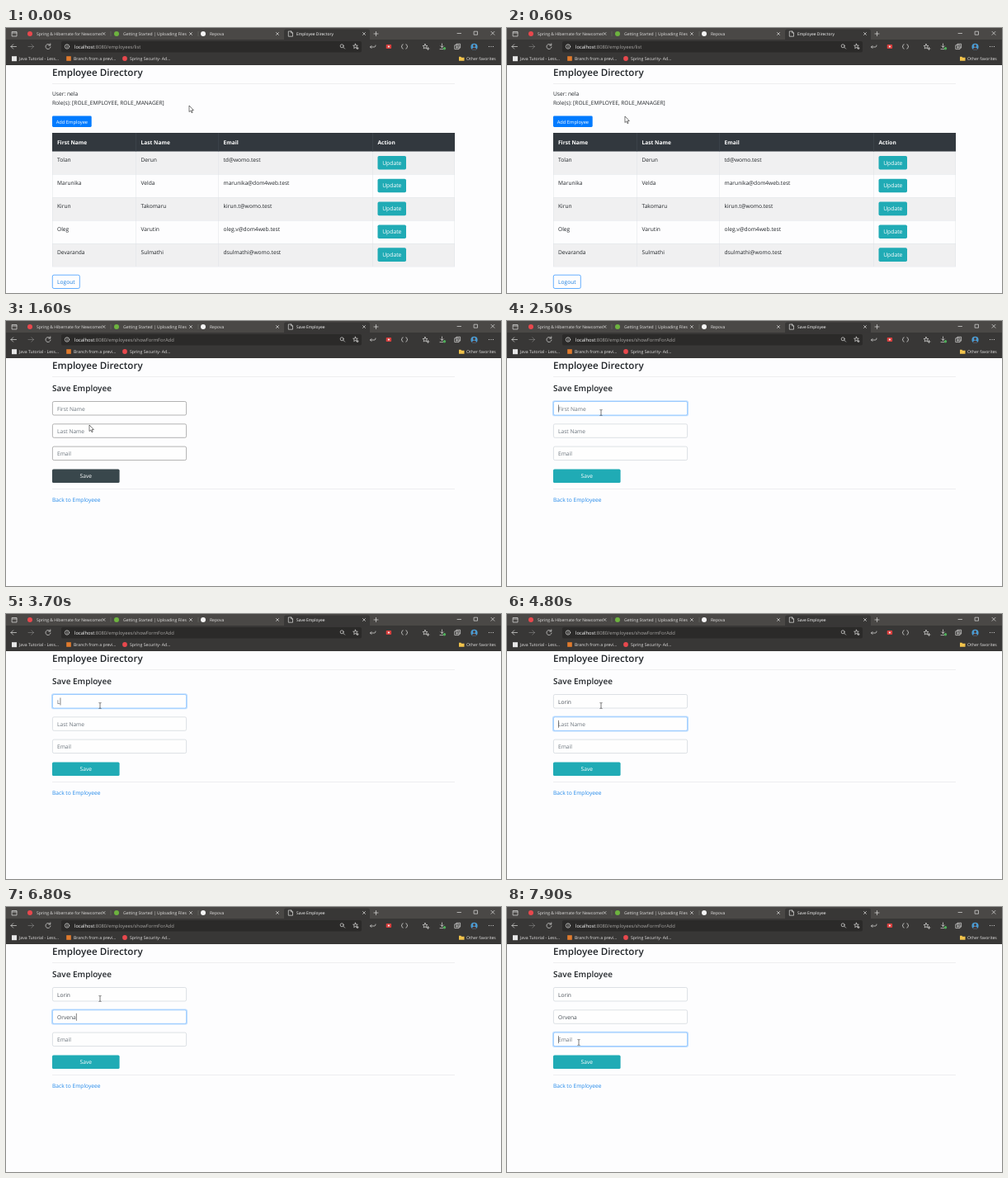
Animation, 600 px wide and 321 px high, one loop 8 s. Source, as an HTML page:

```html
<!DOCTYPE html>
<html lang="en">
<head>
<meta charset="utf-8">
<title>Employee Directory</title>
<style>
  html, body { margin: 0; width: 100%; height: 100%; overflow: hidden; background: #fdfdfe; }
  svg { display: block; width: 100vw; height: 100vh; }
  text { font-family: 'Open Sans', 'Noto Sans', sans-serif; text-rendering: geometricPrecision; white-space: pre; }
  .icon { fill: none; stroke: #dededd; stroke-width: .7; stroke-linecap: round; stroke-linejoin: round; }
</style>
</head>
<body>
<svg viewBox="0 0 600 321">
  <g id="chrome"></g>
  <g id="scene"></g>
</svg>
<script>
const LOOP = 8000, STEP = 100;
const PAGE_SWITCH = 1400, BUTTON_READY = 1900;
const INK = '#212529', TEAL = '#20abb5', BLUE = '#007bff', LINE = '#dee2e6';
const BODY = 6.65;

const text = (x, y, size, str, fill = INK, extra = '') =>
  `<text x="${x}" y="${y}" font-size="${size}" fill="${fill}" ${extra}>${str.replace(/&/g, '&amp;')}</text>`;
const rect = (x, y, w, h, fill, extra = '') =>
  `<rect x="${x}" y="${y}" width="${w}" height="${h}" fill="${fill}" ${extra}/>`;
const circle = (x, y, r, fill, extra = '') => `<circle cx="${x}" cy="${y}" r="${r}" fill="${fill}" ${extra}/>`;
const path = (d, extra = 'class="icon"') => `<path d="${d}" ${extra}/>`;
const BOLD = 'font-weight="600"', MIDDLE = 'text-anchor="middle"';

// Browser frame

const closeMark = (x, y, r) => path(`M${x - r} ${y - r}l${2 * r} ${2 * r}m0 ${-2 * r}l${-2 * r} ${2 * r}`);
const star = (x, y, r) => {
  const points = Array.from({ length: 10 }, (_, i) => {
    const a = i * Math.PI / 5 - Math.PI / 2, d = i % 2 ? r * .45 : r;
    return `${(x + d * Math.cos(a)).toFixed(2)} ${(y + d * Math.sin(a)).toFixed(2)}`;
  });
  return path(`M${points.join('L')}Z`);
};

function browserFrame() {
  const tab = (x, title, color) => circle(x, 7, 3, color) + text(x + 8, 8.9, 5.05, title, '#e4e3e2');
  const bookmark = (x, title, mark) => mark + text(x + 6, 38.9, 5.15, title, '#e4e3e2');
  return rect(0, 0, 600, 15, '#4a4846') + rect(0, 14, 600, 31, '#383736')
    + path('M337 14.5V4q0-2.5 2.5-2.5h99q2.5 0 2.5 2.5v10.5z', 'fill="#383736"')
    + path('M127 4v6M233 4v6', 'stroke="#777472" stroke-width=".5"')
    + path('M7.5 4.5h5.5v5.5h-5.5zM7.5 6h5.5')
    + tab(29, 'Spring & Hibernate for Newcomer', '#e8484d')
    + tab(134, 'Getting Started | Uploading Files', '#6db33f')
    + tab(239, 'Repova', '#f4f4f4')
    + path('M342.7 4h3l1.8 1.8v4.4h-4.8zM345.6 4v1.9h1.9')
    + [118.5, 224, 329, 434].map(x => closeMark(x, 7, 1.5)).join('')
    + path('M446 7h5m-2.5-2.5v5M547 6.5h4.5M567.5 4.2h4v4h-4z') + closeMark(590, 6.3, 2)
    // toolbar
    + rect(67, 16, 364, 13.5, '#2b2a29', 'rx="2"')
    + path('M12.5 22.5h-6.5m2.7-2.7l-2.7 2.7l2.7 2.7')
    + path('M27 22.5h6.5m-2.7-2.7l2.7 2.7l-2.7 2.7', 'class="icon" opacity=".4"')
    + path('M53.4 20.7a3 3 0 1 0 .6 2.3M53.8 18.9v2.1h-2.2')
    + circle(74, 22.5, 2.7, 'none', 'class="icon"') + path('M74 22.2v1.6M74 21v.1')
    + circle(407.2, 21.8, 2, 'none', 'class="icon"') + path('M408.8 23.3l1.8 1.8')
    + star(423.5, 22.2, 3) + circle(426, 24.6, 1.4, '#a8a7a6')
    + path('M443 21.5l-1.5 1.5l1.5 1.5m-1.5-1.5h5.5q1-.2 1-2')
    + rect(460.7, 20, 6.4, 5, '#d8403f', 'rx=".8"') + circle(463.9, 22.5, 1.1, '#fff')
    + path('M481.2 19.8q-1.2 0-1.2 1.4t-1 1.3q1 0 1 1.3t1.2 1.4m3.6-5.4q1.2 0 1.2 1.4t1 1.3q-1 0-1 1.3t-1.2 1.4')
    + star(508, 22.5, 3.1) + path('M510 25h3m-1.5-1.5v3')
    + path('M528.5 19v4.6m-1.8-1.8l1.8 1.8l1.8-1.8M526 25.6h4') + circle(531.5, 24.8, 1.7, '#4fae5a')
    + path('M544.2 20.8h4.8v4.8h-4.8zM545.8 20.8v-1.5h4.8v4.8h-1.6M546.6 22v2.4m-1.2-1.2h2.4')
    + circle(567.5, 22.8, 4.1, '#4a9bd1') + circle(567.5, 21.6, 1.5, '#4b3530')
    + path('M564.7 25.6q2.8-4 5.6 0q-2.8 2.4-5.6 0z', 'fill="#4b3530"')
    + [585.5, 588, 590.5].map(x => circle(x, 22.5, .6, '#dededd')).join('')
    // bookmarks
    + bookmark(10, 'Java Tutorial - Less...', rect(7, 34.2, 6, 6, '#e6e6e6'))
    + bookmark(76, 'Branch from a previ...', rect(73.2, 34.2, 5.6, 5.6, '#e07a2c'))
    + bookmark(144, 'Spring Security- Ad...', circle(144, 37, 2.9, '#e8484d'))
    + path('M549 34.8h2.4l.8.9h3.3v4h-6.5z', 'fill="#f0c24b"')
    + text(558, 38.9, 5.1, 'Other favorites', '#e4e3e2');
}

// Pages

const tabAndUrl = (title, route) => text(352, 8.9, 4.95, title, '#fff')
  + `<text x="83" y="24.6" font-size="5.8" fill="#a9a7a5"><tspan fill="#fff">localhost</tspan>:8080/employees/${route}</text>`;
const rule = y => rect(56, y, 488, .5, '#dfdfe0');
const heading = text(56, 57.8, 11.65, 'Employee Directory', INK, BOLD) + rule(67.2);

const COLUMNS = [62, 163.5, 263.5, 450.5];
const PEOPLE = [
  ['Tolan', 'Derun', 'td@womo.test'],
  ['Marunika', 'Velda', 'marunika@dom4web.test'],
  ['Kirun', 'Takomaru', 'kirun.t@womo.test'],
  ['Oleg', 'Varutin', 'oleg.v@dom4web.test'],
  ['Devaranda', 'Sulmathi', 'dsulmathi@womo.test'],
];
const TABLE_TOP = 149.5, ROW = 27.86;

function listPage(hover) {
  const row = (person, i) => {
    const y = TABLE_TOP + i * ROW;
    return rect(56, y, 488, ROW, i % 2 ? '#fdfdfe' : '#f0f0f1') + rect(56, y, 488, .5, LINE)
      + person.map((s, c) => text(COLUMNS[c], y + 12.9, BODY, s)).join('')
      + rect(450.5, y + 5.4, 34.5, 16.6, TEAL, 'rx="1.8"')
      + text(467.8, y + 16.1, 6.8, 'Update', '#fff', MIDDLE);
  };
  const bottom = TABLE_TOP + PEOPLE.length * ROW;
  return tabAndUrl('Employee Directory', 'list') + heading
    + text(56, 82.3, BODY, 'User: nela')
    + text(56, 92.9, BODY, 'Role(s): [ROLE_EMPLOYEE, ROLE_MANAGER]')
    + rect(56, 106.5, 47.7, 13.5, hover ? '#0069d9' : BLUE, 'rx="1.4"')
    + text(79.9, 115.5, 5.75, 'Add Employee', '#fff', MIDDLE)
    + PEOPLE.map(row).join('')
    + [56, 157.5, 257.5, 444.5, 543.5].map(x => rect(x, TABLE_TOP, .5, bottom - TABLE_TOP, LINE)).join('')
    + rect(56, bottom, 488, .5, LINE)
    + rect(56, 127, 488, TABLE_TOP - 127, '#32383e')
    + [157.5, 257.5, 444.5].map(x => rect(x, 127, .5, TABLE_TOP - 127, '#454d55')).join('')
    + ['First Name', 'Last Name', 'Email', 'Action']
      .map((s, c) => text(COLUMNS[c], 140.6, 6.6, s, '#fff', 'font-weight="700"')).join('')
    + rect(56.3, 299.2, 33, 16.3, '#fdfdfe', `rx="1.8" stroke="${BLUE}" stroke-width=".6"`)
    + text(72.8, 309.8, BODY, 'Logout', '#1a7fe0', MIDDLE);
}

const FIELDS = [
  { y: 97.5, hint: 'First Name', typed: [[3700, 'L'], [3900, 'Lo'], [4100, 'Lor'], [4400, 'Lorin']] },
  { y: 124.8, hint: 'Last Name', typed: [[5700, 'O'], [6100, 'Or'], [6300, 'Orv'], [6500, 'Orve'], [6700, 'Orven'], [6800, 'Orvena']] },
  { y: 152.1, hint: 'Email', typed: [] },
];
const FIELD_H = 16.5;
const FOCUS = [[2300, 0], [4700, 1], [7800, 2]];
const CARET_OFF = [[2800, 3300], [5200, 5700], [7300, 7800]];

const latest = (steps, t, start) => steps.reduce((v, [at, next]) => t >= at ? next : v, start);

function formPage(t) {
  const settled = t >= BUTTON_READY;
  const focused = latest(FOCUS, t, -1);
  const caretOn = !CARET_OFF.some(([a, b]) => t >= a && t < b);
  const field = ({ y, hint, typed }, i) => {
    const value = latest(typed, t, ''), focus = i === focused;
    const border = focus ? '#80bdff' : settled ? '#ced4da' : '#929292';
    const caret = focus && caretOn ? `<rect class="caret" x="62" y="${y + 4}" width=".6" height="9" fill="#333"/>` : '';
    return (focus ? rect(55, y - 1.3, 165, FIELD_H + 2.6, '#bfdeff', 'rx="2.6"') : '')
      + rect(56.4, y, 162.2, FIELD_H, '#fefefe', `rx="1.8" stroke="${border}" stroke-width=".7"`)
      + text(62, y + 11.3, BODY, value || hint, value ? '#495057' : '#6c757d', value && focus ? 'class="active"' : '')
      + caret;
  };
  return tabAndUrl('Save Employee', 'showFormForAdd') + heading
    + text(56, 85, 10, 'Save Employee', INK, BOLD)
    + FIELDS.map(field).join('')
    + rect(56, 179.6, 81.6, 16.4, settled ? TEAL : '#39474c', 'rx="1.6"')
    + text(96.8, 190.2, BODY, 'Save', '#fff', MIDDLE)
    + rule(203.3)
    + text(56, 218.6, BODY, 'Back to Employeee', '#2289ea');
}

// Pointer: time, x, y

const TRACK = [
  [0, 222, 94], [1000, 100, 114], [1400, 100, 114], [1600, 101, 126], [1800, 101, 126],
  [2300, 114, 111], [7200, 114, 111], [7700, 87, 164], [LOOP, 87, 164],
];
const SHAPES = {
  arrow: path('M0 0v7.6l1.8-1.6l1.2 2.7l1.2-.5l-1.2-2.6h2.4z', 'fill="#fff" stroke="#222" stroke-width=".6"'),
  hand: path('M-.8 .6q.8-1 1.6 0v3.2l3.2.8q1 .4.8 1.6l-.7 3.8h-4.2l-2.6-3.6q.3-1 1.9 0z', 'fill="#fff" stroke="#222" stroke-width=".6"'),
  beam: path('M-1.5-3.5q1.5 0 1.5.7q0-.7 1.5-.7M0-2.8v5.6M-1.5 3.5q1.5 0 1.5-.7q0 .7 1.5 .7', 'fill="none" stroke="#222" stroke-width=".6"'),
};

function pointerAt(t) {
  const i = TRACK.findIndex(([at]) => at > t);
  const [t0, x0, y0] = TRACK[i - 1], [t1, x1, y1] = TRACK[i];
  const u = (t - t0) / (t1 - t0), e = u * u * (3 - 2 * u);
  return { x: x0 + (x1 - x0) * e, y: y0 + (y1 - y0) * e };
}

const scene = document.getElementById('scene');
document.getElementById('chrome').innerHTML = browserFrame();

function draw(t) {
  const { x, y } = pointerAt(t);
  const onList = t < PAGE_SWITCH;
  const hover = onList && x < 104 && y > 106;
  const overField = t > 1800 && FIELDS.some(f => y >= f.y && y <= f.y + FIELD_H);
  const shape = hover ? 'hand' : overField ? 'beam' : 'arrow';
  scene.innerHTML = (onList ? listPage(hover) : formPage(t))
    + `<g transform="translate(${x} ${y})">${SHAPES[shape]}</g>`;
  const active = scene.querySelector('.active'), caret = scene.querySelector('.caret');
  if (active && caret) caret.setAttribute('x', 62.2 + active.getComputedTextLength());
}

let shown = -1;
function tick() {
  const t = Math.floor(performance.now() % LOOP / STEP) * STEP;
  if (t !== shown) draw(shown = t);
  requestAnimationFrame(tick);
}
tick();
</script>
</body>
</html>
```
